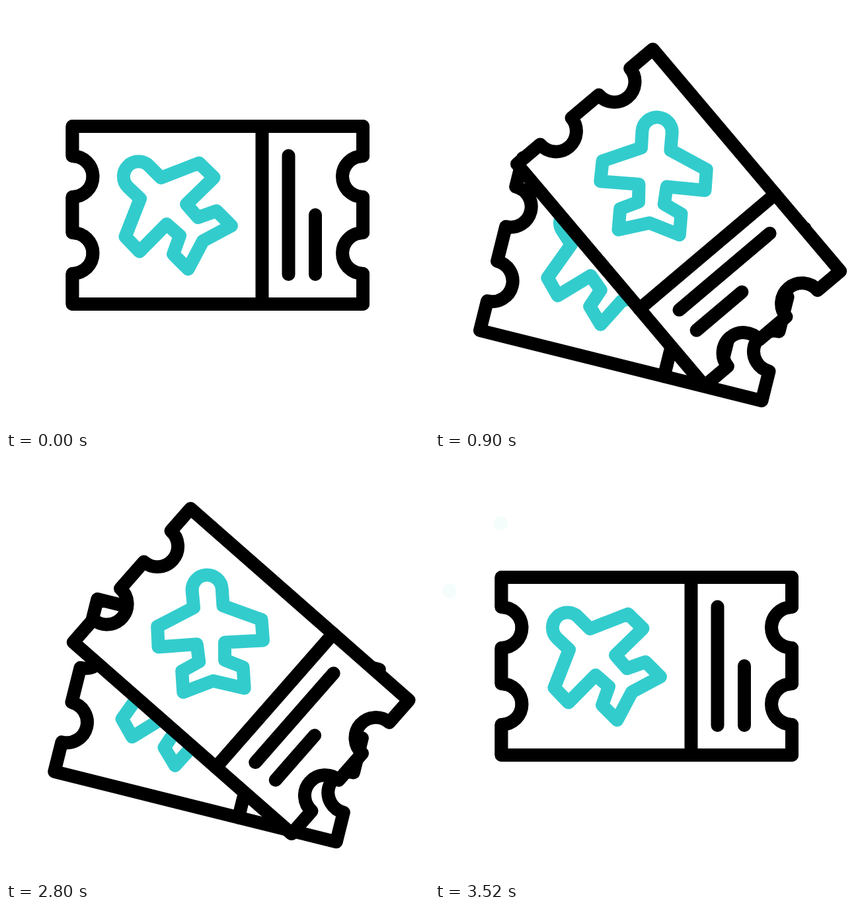
These frames come from a looping animation (640 by 640 pixels, 3600 ms). An HTML page:

```html
<!DOCTYPE html>
<html lang="en">
<head>
<meta charset="utf-8">
<title>Boarding passes</title>
<style>
  html, body { margin: 0; width: 100%; height: 100%; overflow: hidden; background: #fff; }
  svg { display: block; width: 100vw; height: 100vh; }
  .ink, .teal { fill: none; stroke-width: 20; stroke-linecap: round; stroke-linejoin: round; }
  .ink { stroke: #000; }
  .teal { stroke: #33cccd; }
  .paper { fill: #fff; }
  .bar { stroke-width: 22; }
</style>
</head>
<body>
<svg viewBox="0 0 640 640">
  <defs>
    <g id="ticket">
      <path class="ink paper" d="M100.5 182H540V227A31 31 0 0 0 540 289V343A31 31 0 0 0 540 405V451H100.5V405A31 31 0 0 0 100.5 343V289A31 31 0 0 0 100.5 227Z"/>
      <path class="ink" d="M387.5 182V451M427.5 226.5V406M468 316V406"/>
      <path class="teal" d="M184.5 274A22.6 22.6 0 0 1 216.5 242L234.5 260L292 237.5L314.5 259.5L273 300L290.5 320L318.5 310L341 332.5L298 355.5L275.5 398L253 375.5L263 347.5L243 330L202 371.5L180.5 349L203 291.5Z"/>
    </g>
  </defs>
  <g id="dots" fill="#33cccd">
    <circle cx="99.5" cy="100.5" r="11"/>
    <circle cx="22" cy="202.5" r="11"/>
  </g>
  <g id="pair">
    <use href="#ticket"/>
    <g id="front">
      <use href="#ticket"/>
      <line class="teal bar" id="longBar" x1="427.5" x2="427.5" y1="406"/>
      <line class="teal bar" id="shortBar" x1="468" x2="468" y1="406"/>
    </g>
  </g>
</svg>
<script>
  const LOOP = 3600, FAN = 35.8, TILT = 14;
  const get = id => document.getElementById(id);
  const [dots, pair, front, longBar, shortBar] =
    ['dots', 'pair', 'front', 'longBar', 'shortBar'].map(get);

  // Eased progress from 0 to 1 between two times
  const ease = (t, from, to) => {
    const x = Math.min(1, Math.max(0, (t - from) / (to - from)));
    return x * x * (3 - 2 * x);
  };

  function setBar(bar, length, k) {
    bar.setAttribute('y2', 406 - length * k);
    bar.style.visibility = k > 0 ? 'visible' : 'hidden';
  }

  function pose(t) {
    let fan, tilt, x, y;
    if (t < 2000) {
      fan = ease(t, 200, 655);
      tilt = ease(t, 575, 860);
      x = -3.1 * fan - 3.4 * tilt;
      y = 40.2 * fan + 56.8 * tilt;
    } else {
      const away = 1 - ease(t, 2650, 3260);
      fan = 1 - ease(t, 2620, 3190);
      tilt = 1 - ease(t, 2809, 3260);
      x = -6.5 * away + 33 * away * (1 - away);
      y = 97 * away;
    }
    pair.setAttribute('transform', `translate(${x} ${y}) rotate(${TILT * tilt} 320 316.5)`);
    front.setAttribute('transform', `rotate(${FAN * fan} 496.5 312)`);
  }

  function draw(t) {
    pose(t);
    setBar(longBar, 179.5, ease(t, 1260, 1620) - ease(t, 2310, 2620));
    setBar(shortBar, 90, ease(t, 1420, 1760) - ease(t, 2190, 2480));
    dots.setAttribute('opacity', 0.045 * ease(t, 3180, 3280));
    dots.setAttribute('transform', `translate(${10 * (1 - ease(t, 3180, 3520))} 0)`);
  }

  const start = performance.now();
  function tick() {
    draw((performance.now() - start) % LOOP);
    requestAnimationFrame(tick);
  }
  tick();
</script>
</body>
</html>
```
